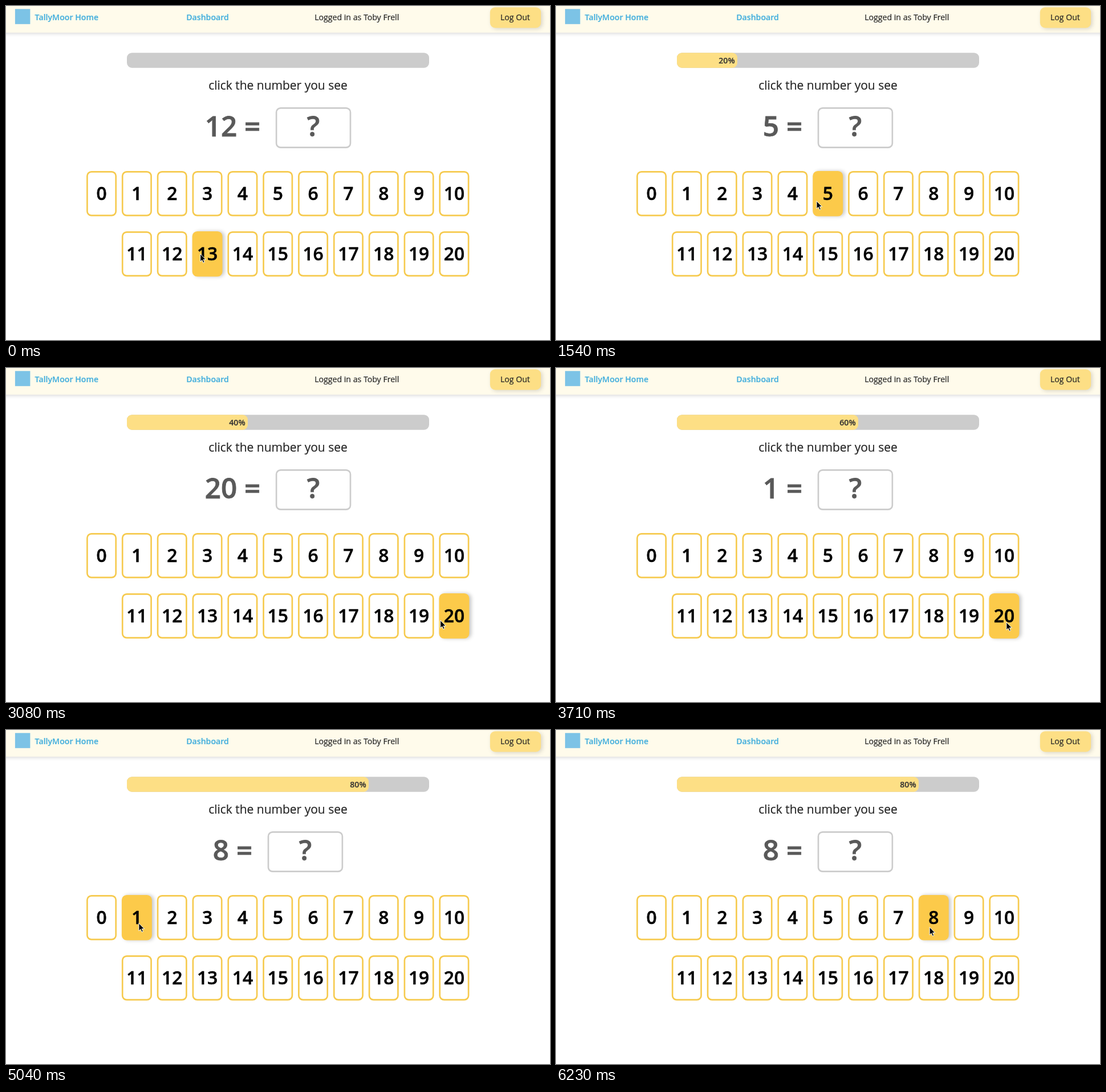
An HTML page that plays this animation: 954 by 587 pixels, repeating every 6300 ms.

```html
<!DOCTYPE html>
<html lang="en">
<head>
<meta charset="utf-8">
<title>Number practice</title>
<style>
  html, body { margin: 0; width: 100%; height: 100%; overflow: hidden; background: #fff; }
  svg { display: block; width: 954px; height: 587px; }
  text {
    font: 400 16px "Open Sans", sans-serif;
    color: #262626; fill: currentColor; stroke: currentColor; stroke-width: .25px;
  }
  .link { font-weight: 600; color: #47b0dd; }
  .middle { text-anchor: middle; }
  .header { fill: #fffbeb; filter: drop-shadow(0 3px 3px rgba(0, 0, 0, .12)); }
  .logout { fill: #fddf85; filter: drop-shadow(3px 2px 4px rgba(0, 0, 0, .15)); }
  .prompt { font-size: 23.75px; }
  #percent { font-weight: 600; color: #333; text-anchor: end; }
  .big { font-size: 56px; font-weight: 600; color: #595959; stroke-width: .9px; }
  .card rect { fill: #fff; stroke: #f6ca4e; stroke-width: 3; }
  .card text { font-size: 36px; font-weight: 600; color: #000; text-anchor: middle; stroke-width: .6px; }
  .card.hover rect { fill: #fcca4a; stroke: #fcca4a; filter: drop-shadow(4px 0 3.5px rgba(0, 0, 0, .22)); }
</style>
</head>
<body>
<svg viewBox="0 0 1080 664.53">
  <rect class="header" x="-20" y="-20" width="1120" height="73"/>
  <rect x="18" y="6" width="30" height="30" fill="#7cc3e6"/>
  <text class="link" x="57.3" y="28.7">TallyMoor Home</text>
  <text class="link" x="358" y="28.7">Dashboard</text>
  <text x="612.6" y="28.7">Logged in as Toby Frell</text>
  <rect class="logout" x="961" y="2.5" width="101" height="41" rx="10"/>
  <text class="middle" x="1010.8" y="28.7">Log Out</text>

  <rect x="240" y="93" width="600" height="30" rx="10" fill="#ccc"/>
  <rect id="fill" x="240" y="93" height="30" rx="10" fill="#fddf85"/>
  <text id="percent" y="114"></text>
  <text class="prompt middle" x="540" y="166.5">click the number you see</text>

  <text id="question" class="big" y="259.6"></text>
  <g id="answer">
    <rect x="1.5" y="203" width="147" height="78.5" rx="8.5" fill="#fff" stroke="#ccc" stroke-width="3"/>
    <text class="big middle" x="75" y="259.6">?</text>
  </g>

  <g id="cards"></g>
  <path id="cursor" d="M0 0V13.6L3.1 10.8L5.2 15.6L7.5 14.6L5.4 9.9H9.6Z" fill="#000" stroke="#fff"/>
</svg>
<script>
  const LOOP = 6300, STEP = 70, UNIT = 1080 / 954, SLOW = 45;
  const $ = id => document.getElementById(id);

  const cards = Array.from({ length: 21 }, (_, n) => {
    const lower = n > 10;
    const x = 159.7 + (lower ? n - 10 : n) * 70;
    const y = lower ? 448.3 : 328.3;
    $("cards").insertAdjacentHTML("beforeend",
      `<g class="card"><rect x="${x + 1.5}" y="${y + 1.5}" width="57" height="87" rx="8.5"/>` +
      `<text x="${x + 30}" y="${y + 58}">${n}</text></g>`);
    return { x, y, node: $("cards").lastElementChild };
  });

  // a point given as an offset from the middle of a card
  const onCard = (n, dx, dy) => [cards[n].x + 30 + dx, cards[n].y + 45 + dy];

  // the pointer travels to the number's card between leave and arrive
  const rounds = [
    { number: 12, leave: 0, arrive: 210, done: 700, spot: onCard(12, 19, 9.5) },
    { number: 5, leave: 1260, arrive: 1820, done: 2100, spot: onCard(5, -6, 11) },
    { number: 20, leave: 2730, arrive: 3430, done: 3500, spot: onCard(20, 4.5, 12.5) },
    { number: 1, leave: 3920, arrive: 4550, done: 4760, spot: onCard(1, 4, 11) },
    { number: 8, leave: 5460, arrive: 5950, done: LOOP, spot: onCard(8, -8, 19) }
  ];
  const home = onCard(13, -14, 0);

  const easeOut = (u, power) => 1 - (1 - u) ** power;

  function pointerAt(t) {
    const i = rounds.findLastIndex(r => r.leave <= t);
    const { leave, arrive, spot } = rounds[i];
    const from = i ? rounds[i - 1].spot : home;
    const u = Math.min(1, (t - leave) / (arrive - leave));
    // height settles sooner than the sideways move, which bends the path
    return [3.5, 5].map((power, k) => from[k] + (spot[k] - from[k]) * easeOut(u, power));
  }

  function showRound(i) {
    const label = `${rounds[i].number} =`;
    const textWidth = 56 * (0.571 * (label.length - 1) + 0.26);
    const left = 540 - (textWidth + 180) / 2;
    const progress = i * 100 / rounds.length;
    $("question").textContent = label;
    $("question").setAttribute("x", left);
    $("answer").setAttribute("transform", `translate(${left + textWidth + 30})`);
    $("fill").setAttribute("width", progress * 6);
    $("percent").setAttribute("x", 235 + progress * 6);
    $("percent").textContent = progress ? `${progress}%` : "";
  }

  function showPointer(t) {
    const [x, y] = pointerAt(t);
    const [lastX, lastY] = pointerAt(Math.max(0, t - STEP));
    const slow = Math.hypot(x - lastX, y - lastY) < SLOW;
    $("cursor").setAttribute("transform", `translate(${x} ${y}) scale(${UNIT})`);
    for (const c of cards) {
      const over = x >= c.x && x < c.x + 60 && y >= c.y && y < c.y + 90;
      c.node.classList.toggle("hover", slow && over);
    }
  }

  let shown;
  function draw() {
    const t = Math.floor(performance.now() % LOOP / STEP) * STEP;
    if (t !== shown) {
      shown = t;
      showRound(rounds.findIndex(r => t < r.done));
      showPointer(t);
    }
    requestAnimationFrame(draw);
  }
  draw();
</script>
</body>
</html>
```
